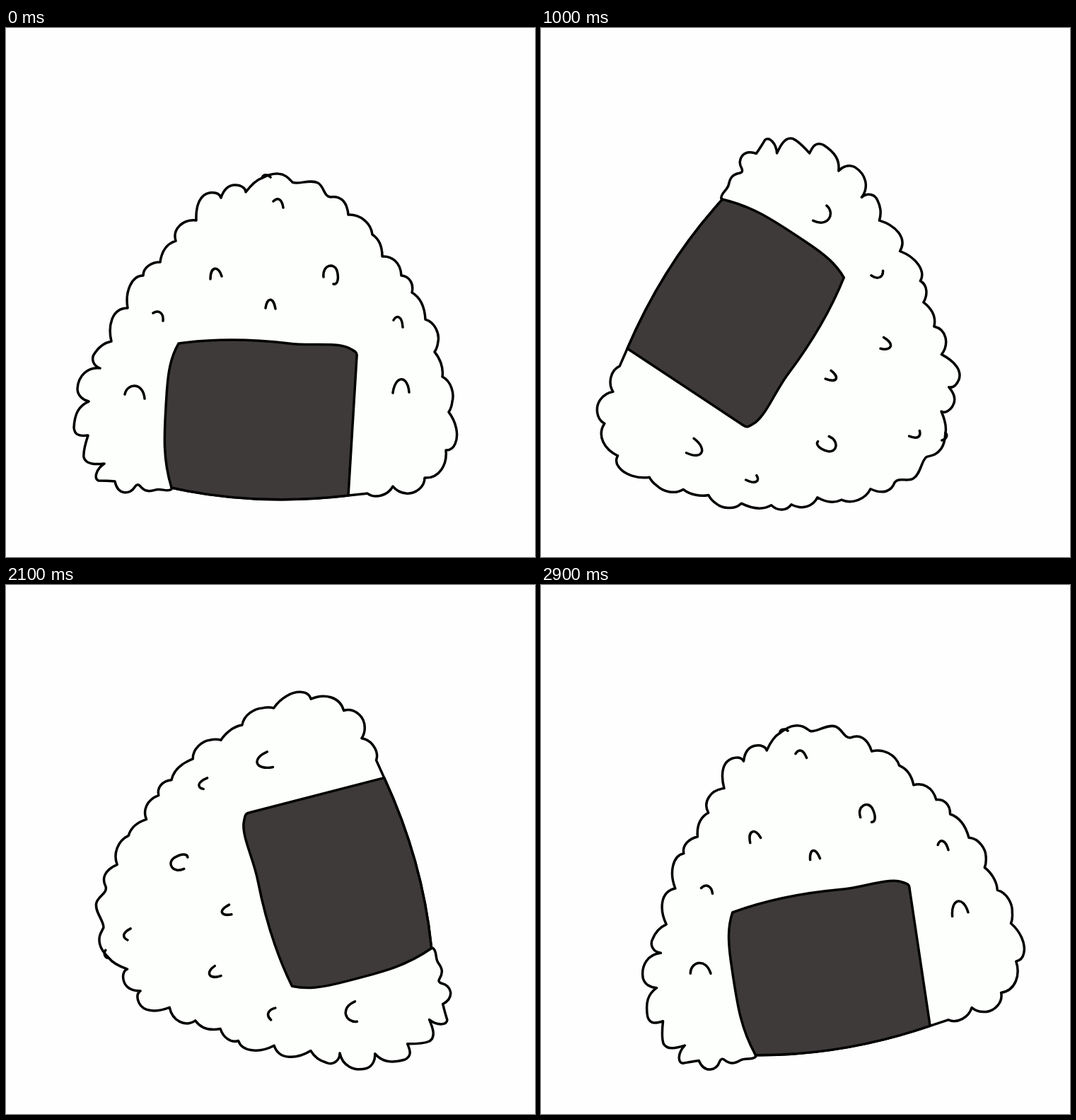
Recreate the animation shown at these times as an HTML page. Size 748 by 748 pixels, loop 3000 ms.

```html
<!DOCTYPE html>
<html>
<head>
<meta charset="utf-8">
<title>Rolling rice ball</title>
<style>
html, body { margin: 0; width: 100%; height: 100%; overflow: hidden; background: #fefefe; }
svg { display: block; width: 100%; height: 100%; }
path { stroke: #000; stroke-width: 3.5; stroke-linecap: round; stroke-linejoin: round; }
#rice { fill: #fdfffc; }
#nori { fill: #3e3a39; }
#grains { fill: none; }
</style>
</head>
<body>
<svg viewBox="0 0 748 748">
  <g id="ball">
    <path id="rice" d="M234 652C228 657 219 650 211 653C202 656 196 655 190 648Q186 643 182 649
      C176 660 158 661 154 641Q140 640 131 640C124 637 127 624 139 616C128 617 113 618 110 607
      C109 598 113 585 116 576C106 577 97 577 96 565C97 545 103 534 117 528C109 526 101 520 101 510
      C102 492 115 479 133 481C122 477 120 466 126 459C132 450 140 445 149 443C144 422 149 396 172 396
      C168 372 178 350 194 350C194 338 206 331 218 331C220 316 227 305 240 301C235 284 250 270 269 272
      C268 250 275 235 288 233C296 232 302 234 304 240C308 228 315 222 324 222C333 222 339 227 339 232
      C345 224 353 215 362 212C370 208 378 205 385 206C396 207 400 213 405 218C413 222 430 213 441 219
      C450 224 449 238 459 239C471 237 482 243 484 264C500 263 516 275 518 292C527 298 532 308 532 323
      C545 322 558 331 559 350C570 351 577 361 574 374C586 381 592 395 593 412C607 416 613 433 611 443
      Q610 452 606 458C613 466 619 480 617 493C630 500 634 517 631 528Q630 537 626 543
      C636 556 641 575 635 588C632 595 627 597 622 597C624 617 613 637 592 636C592 650 578 659 566 658
      C557 657 551 653 547 648C540 661 522 666 511 658L484 661C400 671 320 669 234 650Z"/>
    <path id="nori" d="M234 650C222 610 223 580 227 520C229 485 233 465 244 446C300 438 350 440 400 446
      C430 450 465 444 484 452C494 457 497 459 496 464L484 661C400 671 320 669 234 650Z"/>
    <path id="grains" d="M362 212C364 206 371 207 374 211M378 245C384 239 390 241 392 254
      M289 355C289 336 301 336 305 351M449 352C447 335 464 331 468 343C471 354 469 363 463 362
      M367 396C369 381 378 379 381 397M208 403C216 398 223 403 222 414M548 413C552 405 560 407 561 423
      M168 518C171 502 194 500 196 524M547 516C550 491 568 490 570 515"/>
  </g>
</svg>
<script>
const ball = document.getElementById('ball');
const rice = document.getElementById('rice');
const STEP = 100, STEPS = 30;
const PIVOT = { x: 367, y: 470 };

// [step, pivot x, floor height]
const keys = [
  [0, 367, 667], [3, 340, 676], [6, 336, 671], [10, 346, 681], [12, 349, 677],
  [14, 376, 677], [16, 384, 682], [18, 390, 678], [22, 389, 687], [23, 387, 689],
  [24, 384, 682], [25, 381, 689], [27, 388, 694], [29, 396, 685]
];

const length = rice.getTotalLength();
const outline = Array.from({ length: 500 }, (_, i) => rice.getPointAtLength(length * i / 500));

function placeAt(step) {
  const i = Math.max(1, keys.findIndex(key => key[0] >= step));
  const [from, to] = [keys[i - 1], keys[i]];
  const k = (step - from[0]) / (to[0] - from[0]);
  return [1, 2].map(n => from[n] + (to[n] - from[n]) * k);
}

// Turn the ball and rest its lowest point on the floor.
function pose(step) {
  const degrees = step * 360 / STEPS, angle = degrees * Math.PI / 180;
  const sin = Math.sin(angle), cos = Math.cos(angle);
  const drop = Math.max(...outline.map(p => (p.x - PIVOT.x) * sin + (p.y - PIVOT.y) * cos));
  const [x, floor] = placeAt(step);
  ball.setAttribute('transform',
    `translate(${x} ${floor - drop}) rotate(${degrees}) translate(${-PIVOT.x} ${-PIVOT.y})`);
}

const start = performance.now();
function draw() {
  pose(Math.floor((performance.now() - start) / STEP) % STEPS);
  requestAnimationFrame(draw);
}
draw();
</script>
</body>
</html>
```
